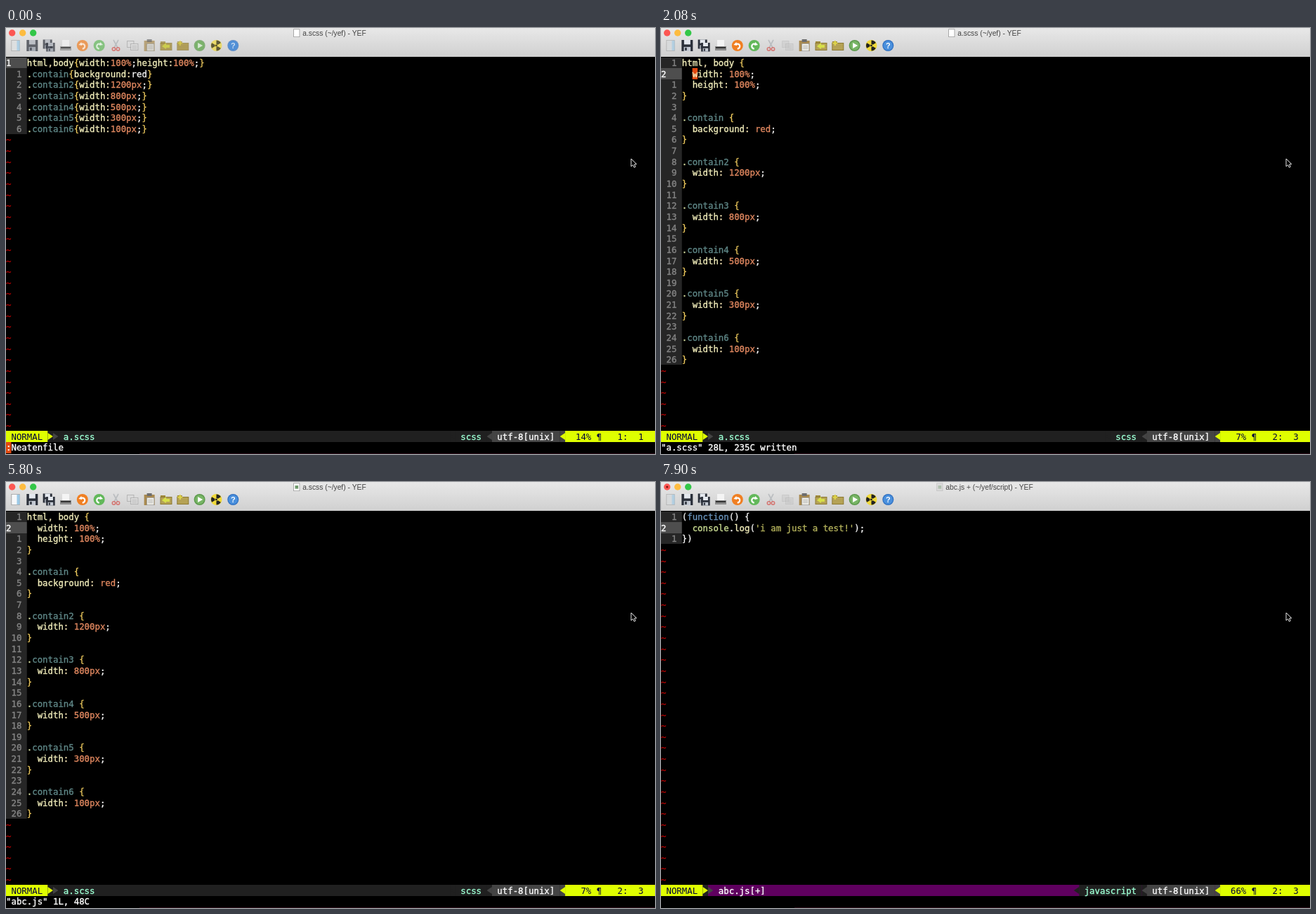
An HTML page with a canvas that plays this animation: 924x606 px, repeating every 8000 ms.

```html
<!DOCTYPE html>
<html lang="en">
<head>
<meta charset="utf-8">
<title>Editor session</title>
<style>
  html, body { margin: 0; width: 100%; height: 100%; overflow: hidden; background: #000; }
  canvas { display: block; width: 100vw; height: 100vh; }
</style>
</head>
<body>
<canvas id="stage" width="924" height="606"></canvas>
<script>
const ctx = document.getElementById('stage').getContext('2d');
const LOOP = 8000, COL = 7.44, ROW = 15.64, TOP = 41.5;
const STATUS_ROW = 34, COMMAND_ROW = 35;
const MONO = '12.36px "DejaVu Sans Mono", monospace';
const SANS = '10.27px "Liberation Sans", Arial, sans-serif';
const CURSOR = '#e2480f', LIME = '#dfff00', GREY = '#444444', DARK = '#202020', INK = '#00003a';

// Buffers
const widths = ['1200px', '800px', '500px', '300px', '100px'];
const compactCss = ['html,body{width:100%;height:100%;}', '.contain{background:red}',
  ...widths.map((w, i) => `.contain${i + 2}{width:${w};}`)];
const tidyCss = ['html, body {', '  width: 100%;', '  height: 100%;', '}',
  '', '.contain {', '  background: red;', '}',
  ...widths.flatMap((w, i) => ['', `.contain${i + 2} {`, `  width: ${w};`, '}'])];
const compactJs = ["(function(){console.log('i am just a test!');})"];
const tidyJs = ['(function() {', "  console.log('i am just a test!');", '})'];

const cssRules = [
  [/^contain\d?/, '#5f8787'], [/^(html|body|width|height|background)/, '#f2eebb'],
  [/^(\d+(px|%)|red(?=;))/, '#df875f'], [/^[{}]/, '#e9c65c'],
  [/^\./, '#d7dfa0'], [/^[:,]/, '#f0e0b0']];
const jsRules = [[/^'.*'/, '#b5b35c'], [/^function/, '#6a94bd'],
  [/^console/, '#c9dc92'], [/^log/, '#f2eebb']];

// Each step changes only the listed properties.
const steps = [
  { at: 0, lines: compactCss, rules: cssRules, line: 0, col: 1, percent: '14%', file: 'a.scss',
    folder: '~/yef', type: 'scss', modified: false, script: false, fade: 0.7, full: true,
    command: ':Neatenfile', caret: 0, cursor: false, match: false },
  { at: 150, lines: tidyCss, line: 1, col: 3, percent: '7%', modified: true, fade: 1,
    full: false, command: '', caret: -1, cursor: true },
  { at: 750, cursor: false },
  { at: 1040, cursor: true },
  { at: 1330, cursor: false, command: ':', caret: 1, full: true },
  { at: 1480, command: ':w', caret: 2 },
  { at: 2080, command: '"a.scss" 28L, 235C written', caret: -1, cursor: true,
    modified: false, full: false },
  { at: 2380, command: ':', caret: 1, cursor: false, full: true },
  { at: 2530, command: ':e', caret: 2 },
  { at: 2820, command: ':e ', caret: 3 },
  { at: 3270, command: ':e a', caret: 4 },
  { at: 3420, command: ':e ab', caret: 5 },
  { at: 3870, command: ':e a', caret: 4 },
  { at: 4010, command: ':e ', caret: 3 },
  { at: 4160, command: ':e s', caret: 4 },
  { at: 4310, command: ':e sc', caret: 5 },
  { at: 4600, command: ':e script/', caret: 10 },
  { at: 4900, command: ':e script/abc.js', caret: 16 },
  { at: 5650, caret: 0 },
  { at: 5800, command: '"abc.js" 1L, 48C', caret: -1, script: true },
  { at: 5950, lines: compactJs, rules: jsRules, line: 0, col: 1, percent: '100%', file: 'abc.js',
    folder: '~/yef/script', type: 'javascript', full: false, cursor: true, match: true },
  { at: 6850, cursor: false },
  { at: 7000, command: ':Neatenfile', caret: 0 },
  { at: 7150, lines: tidyJs, line: 1, col: 3, percent: '66%', modified: true,
    command: '', caret: -1, cursor: true, match: false },
  { at: 7900, cursor: false }
];
const stateAt = t => Object.assign({}, ...steps.filter(s => s.at <= t));

// Drawing helpers
function box(x, y, w, h, color) {
  ctx.fillStyle = color;
  ctx.fillRect(x, y, w, h);
}
function disc(x, y, r, color) {
  ctx.fillStyle = color;
  ctx.beginPath();
  ctx.arc(x, y, r, 0, 7);
  ctx.fill();
}
function shape(color, ...points) {
  ctx.fillStyle = color;
  ctx.beginPath();
  points.forEach(([x, y]) => ctx.lineTo(x, y));
  ctx.closePath();
  ctx.fill();
}
function cells(col, row, count, color) {
  const y = Math.round(TOP + row * ROW);
  box(col * COL, y, count * COL, Math.round(TOP + (row + 1) * ROW) - y, color);
}
function type(text, col, row, color) {
  ctx.font = MONO;
  ctx.textAlign = 'left';
  ctx.fillStyle = ctx.strokeStyle = color;
  ctx.lineWidth = 0.35;
  [...text].forEach((ch, i) => {
    const x = (col + i) * COL, y = TOP + row * ROW + 12.5;
    ctx.fillText(ch, x, y);
    // Light text on dark looks heavier than dark text on light.
    if (color !== INK) ctx.strokeText(ch, x, y);
  });
}
function typeCode(text, row, rules) {
  for (let i = 0; i < text.length;) {
    const rest = text.slice(i);
    const rule = rules.find(([pattern]) => pattern.test(rest));
    const token = rule ? rest.match(rule[0])[0] : rest[0];
    type(token, 4 + i, row, rule ? rule[1] : '#f4f4f4');
    i += token.length;
  }
}

// Toolbar icons, each drawn around its own centre
function page(x, y, w, h, color) {
  box(x, y, w, h, '#909090');
  box(x + 0.7, y + 0.7, w - 1.4, h - 1.4, color);
}
function floppy(x, y, s) {
  box(x, y, s, s, '#2b303a');
  box(x + s * 0.22, y, s * 0.56, s * 0.4, '#e4e8ee');
  box(x + s * 0.2, y + s * 0.62, s * 0.6, s * 0.38, '#c3c9d2');
  box(x + s * 0.3, y + s * 0.68, s * 0.16, s * 0.26, '#2b303a');
}
function turnArrow(color, flip) {
  disc(0, 0, 8, color);
  ctx.scale(flip, 1);
  ctx.strokeStyle = '#fff';
  ctx.lineWidth = 2.2;
  ctx.beginPath();
  ctx.arc(0, 1, 3.4, -2.2, 1.6);
  ctx.stroke();
  shape('#fff', [-5.5, -1], [-1.5, -5], [-0.5, 0]);
}
function folder(mark) {
  box(-8, -6, 7, 4, '#a08a3c');
  box(-8.5, -4, 17, 11, '#8d7a35');
  box(-7.5, -3, 15, 9, '#b5a255');
  mark();
}
const icons = [
  () => {
    page(-6, -8, 12, 16, '#f6f8fa');
    box(2, -7, 4, 14, '#9cc9e6');
  },
  () => floppy(-8, -8, 16),
  () => { floppy(-8.5, -8.5, 13); floppy(-4, -4, 12.5); },
  () => {
    box(-5, -8, 10, 9, '#f4f4f4');
    box(-8, 1, 16, 6, '#8b8b8b');
    box(-7, 2, 14, 2, '#333');
  },
  () => turnArrow('#f07f22', 1),
  () => turnArrow('#62b85a', -1),
  () => {
    ctx.lineWidth = 1.6;
    ctx.strokeStyle = '#a4a8ad';
    ctx.beginPath();
    ctx.moveTo(-3.5, -8); ctx.lineTo(2.5, 3);
    ctx.moveTo(3.5, -8); ctx.lineTo(-2.5, 3);
    ctx.stroke();
    ctx.strokeStyle = '#d33a34';
    for (const x of [-3, 3]) {
      ctx.beginPath();
      ctx.arc(x, 5, 2.2, 0, 7);
      ctx.stroke();
    }
  },
  () => {
    page(-8, -7, 10, 10, '#f1f1f1');
    page(-3, -3, 11, 10, '#f4f4f4');
    for (const y of [0, 2, 4]) box(-1, y, 7, 0.8, '#aaa');
  },
  () => {
    box(-7.5, -7, 15, 15, '#a98a50');
    box(-3.5, -9, 7, 4, '#6d6d6d');
    page(-4, -3, 11, 11, '#f0efe8');
    for (const y of [0, 2, 4]) box(-2, y, 7, 0.8, '#aaa');
  },
  () => folder(() => shape('#d7e04a', [-6, 1], [0, -4], [0, -1], [5, -1], [5, 3], [0, 3], [0, 5])),
  () => folder(() => { box(-5, -7, 2, 7, '#e0d84a'); box(-7.5, -4.5, 7, 2, '#e0d84a'); }),
  () => {
    disc(0, 0, 8, '#5d9a4d');
    disc(0, 0, 6.5, '#78b566');
    shape('#fff', [-2.5, -4], [4.5, 0], [-2.5, 4]);
  },
  () => {
    disc(0, 0, 8, '#f0d93a');
    for (const a of [-1.047, 1.047, 3.142]) {
      ctx.fillStyle = '#222';
      ctx.beginPath();
      ctx.moveTo(0, 0);
      ctx.arc(0, 0, 7.4, a - 0.52, a + 0.52);
      ctx.fill();
    }
    disc(0, 0, 2.2, '#f0d93a');
    disc(0, 0, 1.4, '#222');
  },
  () => {
    disc(0, 0, 8, '#2f6fc0');
    disc(0, 0, 6.8, '#4a90dd');
    ctx.font = 'bold 11px "Liberation Sans", sans-serif';
    ctx.textAlign = 'center';
    ctx.fillStyle = '#fff';
    ctx.fillText('?', 0, 4);
  }
];

function drawWindowBar(s) {
  const shade = ctx.createLinearGradient(0, 0, 0, 41);
  shade.addColorStop(0, '#e8e8e8');
  shade.addColorStop(1, '#d0d0d0');
  box(0, 0, 924, 41, shade);
  ['#fc5753', '#fdbc40', '#33c748'].forEach((c, i) => disc(8.7 + i * 15, 7, 4.7, c));
  if (s.modified) disc(8.7, 7, 1.6, '#7a1510');

  const title = `${s.file}${s.modified ? ' +' : ''} (${s.folder}) - YEF`;
  ctx.font = SANS;
  ctx.textAlign = 'center';
  ctx.fillStyle = '#454545';
  ctx.fillText(title, 467.5, 10.5);
  const left = 467.5 - ctx.measureText(title).width / 2 - 13;
  ctx.globalAlpha = s.modified ? 0.4 : 1;
  page(left, 1.5, 9, 11.5, '#fff');
  if (s.script) box(left + 2.2, 5, 4.6, 4.6, '#6f9a6c');

  icons.forEach((draw, i) => {
    ctx.save();
    ctx.translate(13.5 + i * 23.83, 25);
    ctx.globalAlpha = s.fade;
    if (i === 0 && !s.full) ctx.globalAlpha = 0.6;
    if (i === 6) ctx.globalAlpha = 0.6;
    if (i === 7) ctx.globalAlpha = s.full ? 0.7 : 0.3;
    draw();
    ctx.restore();
  });
  ctx.globalAlpha = 1;
}

function drawBuffer(s) {
  for (let row = 0; row < STATUS_ROW; row++) {
    if (row >= s.lines.length) {
      type('~', 0, row, '#b80000');
      continue;
    }
    const current = row === s.line;
    cells(0, row, 4, current ? '#4e4e4e' : '#262626');
    // Other lines show their distance from the cursor.
    const label = current ? String(row + 1) : String(Math.abs(row - s.line)).padStart(3);
    type(label, 0, row, current ? '#ffffff' : '#858585');
    if (s.match) [4, 3 + s.lines[row].length].forEach(col => cells(col, row, 1, '#0a6fc2'));
    if (current && s.cursor) cells(3 + s.col, row, 1, CURSOR);
    typeCode(s.lines[row], row, s.rules);
  }
}

function arrow(col, direction, color, back) {
  cells(col, STATUS_ROW, 1, back);
  const x = col * COL, base = direction > 0 ? x : x + COL, y = TOP + STATUS_ROW * ROW + 7.7;
  shape(color, [base, y - 5], [base + direction * COL, y], [base, y + 5]);
}

function drawStatus(s) {
  const back = s.modified ? '#5f005f' : DARK, typeCol = 91 - s.type.length;
  const put = (text, col, color) => type(text, col, STATUS_ROW, color);
  cells(0, STATUS_ROW, 125, back);
  cells(0, STATUS_ROW, 8, LIME);
  put('NORMAL', 1, INK);
  arrow(8, 1, LIME, DARK);
  arrow(9, 1, GREY, back);
  put(s.file + (s.modified ? '[+]' : ''), 11, s.modified ? '#ffffff' : '#9cffd3');
  cells(typeCol - 1, STATUS_ROW, s.type.length + 2, DARK);
  arrow(typeCol - 2, -1, DARK, back);
  put(s.type, typeCol, '#9cffd3');
  arrow(92, -1, GREY, DARK);
  cells(93, STATUS_ROW, 13, GREY);
  put('utf-8[unix]', 94, '#ffffff');
  arrow(106, -1, LIME, GREY);
  cells(107, STATUS_ROW, 18, LIME);
  put(`${s.percent.padStart(4)} ¶   ${s.line + 1}:  ${s.col}`, 108, INK);
}

function drawPointer() {
  ctx.strokeStyle = '#e8e8e8';
  ctx.lineWidth = 1;
  shape('#000', [890, 186], [890, 197], [892.6, 194.8], [894.3, 198.4], [896.2, 197.5],
    [894.6, 194], [897.8, 193.7]);
  ctx.stroke();
}

const start = performance.now();
function frame() {
  const s = stateAt((performance.now() - start) % LOOP);
  box(0, 0, 924, 606, '#000');
  drawWindowBar(s);
  drawBuffer(s);
  drawStatus(s);
  if (s.caret >= 0) cells(s.caret, COMMAND_ROW, 1, CURSOR);
  type(s.command, 0, COMMAND_ROW, '#ffffff');
  box(190, 605, 734, 1, '#2a0d18');
  drawPointer();
  requestAnimationFrame(frame);
}
frame();
</script>
</body>
</html>
```
